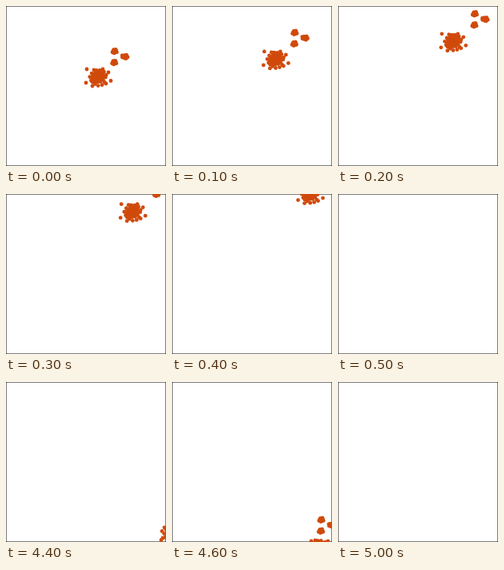
Animation, 200 px wide and 200 px high, one loop 8 s. Source, as an HTML page with a canvas:

```html
<!DOCTYPE html>
<html lang="en">
<head>
<meta charset="utf-8">
<title>Drifting clusters</title>
<style>
  html, body { margin: 0; width: 100%; height: 100%; overflow: hidden; background: #fff; }
  canvas { display: block; width: 200px; height: 200px; }
</style>
</head>
<body>
<canvas id="stage" width="200" height="200"></canvas>
<script>
const SIZE = 200, LOOP = 8000, STEP = 100, RADIUS = 2.4, TAU = Math.PI * 2;
const GOLDEN = Math.PI * (3 - Math.sqrt(5));
const ctx = document.getElementById('stage').getContext('2d');

function seeded(seed) {
  return () => (seed = seed * 16807 % 2147483647) / 2147483647;
}

// Dots spread evenly over an ellipse
function disc(count, rx, ry = rx) {
  return Array.from({ length: count }, (_, i) => {
    const r = Math.sqrt((i + 0.5) / count), a = i * GOLDEN;
    return [rx * r * Math.cos(a), ry * r * Math.sin(a)];
  });
}

// Dots around the core at slightly uneven distances
function ring(count, radius, spread, seed) {
  const random = seeded(seed);
  return Array.from({ length: count }, (_, i) => {
    const a = (i + random() * 0.5) / count * TAU, r = radius + spread * random();
    return [r * Math.cos(a), r * Math.sin(a)];
  });
}

const burst = strays => [...disc(32, 7.5), ...ring(14, 8.5, 2.5, 41), ...strays];
const blob = disc(11, 3.2, 2.8);
const longBlob = disc(13, 4.2, 2.6);

// A burst and three blobs beside it, each with its own speed per step
function flight(start, end, main, mainSpeed, side, sideSpeed, strays) {
  const [x, y] = side;
  return { start, end, groups: [
    { dots: burst(strays), at: main, speed: mainSpeed },
    { dots: blob, at: [x, y], speed: sideSpeed },
    { dots: longBlob, at: [x + 13, y + 6.5], speed: sideSpeed },
    { dots: blob, at: [x - 0.5, y + 14], speed: sideSpeed }
  ] };
}

const flights = [
  flight(0, 500, [115, 89], [14.4, -22.1], [135.8, 56.8], [17.6, -23.4],
    [[-14, -10], [-15, 7], [16, 4.5], [13, -6], [10, 8], [-7, 11], [6, -10]]),
  flight(4400, 5000, [208, 190], [-12, 8.5], [211, 154], [-12.2, 9.2],
    [[-10, -8], [-13, -3.5], [-12, 5], [-14, 7.5], [11, -8]])
];

function drawGroup({ dots, at, speed }, steps) {
  for (const [dx, dy] of dots) {
    ctx.beginPath();
    ctx.arc(at[0] + speed[0] * steps + dx, at[1] + speed[1] * steps + dy, RADIUS, 0, TAU);
    ctx.fill();
  }
}

function draw(t) {
  ctx.fillStyle = '#fff';
  ctx.fillRect(0, 0, SIZE, SIZE);
  // Centred on the edge, so only half of the line shows
  ctx.strokeStyle = '#000';
  ctx.strokeRect(0, 0, SIZE, SIZE);
  ctx.fillStyle = '#d04a0c';
  for (const { start, end, groups } of flights) {
    if (t < start || t >= end) continue;
    const steps = Math.floor((t - start) / STEP);
    groups.forEach(g => drawGroup(g, steps));
  }
}

const origin = performance.now();
function tick() {
  draw((performance.now() - origin) % LOOP);
  requestAnimationFrame(tick);
}
tick();
</script>
</body>
</html>
```
